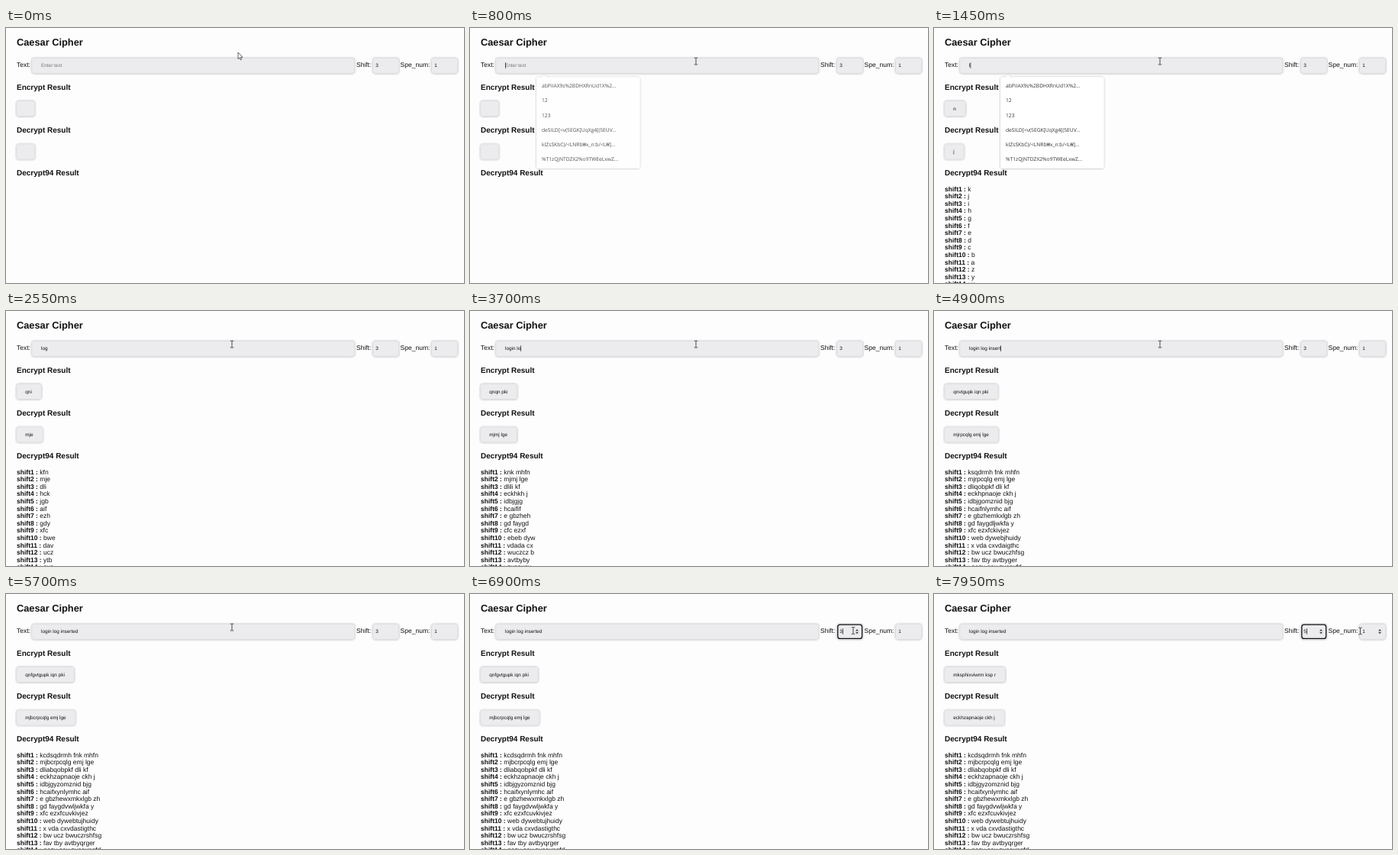
Animation, 600 px wide and 334 px high, one loop 8 s. Source, as an HTML page:

```html
<!DOCTYPE html>
<html lang="en">
<head>
<meta charset="utf-8">
<title>Caesar Cipher</title>
<style>
  html, body { margin: 0; width: 100%; height: 100%; overflow: hidden; background: #fdfdfe; }
  svg { display: block; width: 600px; height: 334px; }
  text { font-family: "Liberation Sans", Arial, sans-serif; fill: #111; text-rendering: geometricPrecision; }
  .title { font-size: 12.8px; font-weight: bold; }
  .heading { font-size: 10px; font-weight: bold; }
  .body { font-size: 8.53px; }
  .body tspan { font-weight: bold; }
  .small { font-size: 6.4px; }
  .hint { fill: #777; }
  .field { fill: #ecebed; stroke: #d6d5d8; stroke-width: .5; filter: url(#glow); }
  .menu { fill: #fff; filter: url(#glow); }
  .option { font: 6.7px "Open Sans", "Noto Sans", sans-serif; fill: #333; }
  .caret { fill: #111; }
  .ring { fill: none; stroke: #111; stroke-width: 1.3; }
</style>
</head>
<body>
<svg id="stage" viewBox="0 0 600 334">
  <defs>
    <filter id="glow" x="-20%" y="-20%" width="140%" height="140%">
      <feDropShadow dx="0" dy="0.2" stdDeviation="1" flood-color="#000" flood-opacity=".36"/>
    </filter>
  </defs>
</svg>
<script>
const LOOP = 8000, ROWS = 14, BLINK = 500;
const PHRASE = 'login log inserted';
const KEY_TIMES = [1400, 1750, 1950, 2600, 2750, 3150, 3500, 3650, 3800,
  3950, 4100, 4250, 4400, 4550, 4700, 4850, 5000, 5150];
const CLICK_TEXT = 700, MENU_END = 1490, CLICK_SHIFT = 6800, NEW_SHIFT = 7460;
const OPTIONS = ['abPiIAX9s%2BDHXRnUd1X%2...', '12', '123', 'deSILD[<v(5EGK[UqXg4[(5EUV...',
  'kIZsSKbC)/<LNRb₩x_n:b/<L₩]...', '%T1zQjNTDZX2%o9TWEeLxwZ...'];
// Pointer stops: time, x, y
const PATH = [[0, 304, 32], [100, 304, 32], [550, 296, 43.5], [5850, 296, 43.5],
  [6650, 502, 48], [7150, 502, 48], [7620, 558.5, 48.5], [8000, 558.5, 48.5]];

const stage = document.getElementById('stage');
const pen = document.createElement('canvas').getContext('2d');
pen.font = '6.4px "Liberation Sans", Arial, sans-serif';
const widthOf = s => pen.measureText(s).width;

function add(tag, attrs, parent = stage) {
  const node = document.createElementNS('http://www.w3.org/2000/svg', tag);
  for (const key in attrs) node.setAttribute(key, attrs[key]);
  return parent.appendChild(node);
}
function label(x, y, cls, content = '', parent = stage) {
  const node = add('text', { x, y, class: cls }, parent);
  node.textContent = content;
  return node;
}
const field = (x, y, width) => add('rect', { x, y, width, height: 20, rx: 3, class: 'field' });
const show = (node, on) => node.setAttribute('visibility', on ? 'visible' : 'hidden');
const move = (node, x, y) => node.setAttribute('transform', `translate(${x} ${y})`);
function write(node, s) {
  if (node.textContent !== s) node.textContent = s;
}

label(14, 23, 'title', 'Caesar Cipher');
label(14, 51.3, 'body', 'Text:');
label(459, 51.3, 'body', 'Shift:');
label(516.6, 51.3, 'body', 'Spe_num:');
field(33.8, 39.3, 423);
field(480.7, 39.3, 34);
field(557.5, 39.3, 34);
label(14, 80.7, 'heading', 'Encrypt Result');
label(14, 136.9, 'heading', 'Decrypt Result');
label(14, 193, 'heading', 'Decrypt94 Result');

const hint = label(46, 51.2, 'small hint', 'Enter text');
const input = label(46, 51.2, 'small');
const shiftValue = label(484.3, 51.2, 'small');
label(561.2, 51.2, 'small', '1');

const results = [95.5, 152].map(y => ({
  box: field(13.8, y, 24),
  text: label(25.3, y + 12, 'small')
}));

const rows = Array.from({ length: ROWS }, (_, i) => {
  const row = label(14, 213.6 + 9.6 * i, 'body');
  const name = add('tspan', {}, row);
  name.textContent = `shift${i + 1} :`;
  return { row, value: row.appendChild(document.createTextNode('')) };
});

const ring = add('rect', { x: 481.8, y: 40.2, width: 31.8, height: 18.2, rx: 3, class: 'ring' });
const spinner = x => add('path', { d: `M${x - 2} 48.4l2-2.4 2 2.4zM${x - 2} 49.9l2 2.4 2-2.4z`, fill: '#444' });
const shiftSpin = spinner(507), numSpin = spinner(584);
const caret = add('rect', { y: 45.2, width: .7, height: 7.6, class: 'caret' });

const menu = add('g', {});
add('path', { d: 'M90 64.3H94L97 61.6 100 64.3H219.5a3 3 0 0 1 3 3V181a3 3 0 0 1-3 3H90a3 3 0 0 1-3-3V67.3a3 3 0 0 1 3-3z', class: 'menu' }, menu);
OPTIONS.forEach((s, i) => label(94, 78 + 19.25 * i, 'option', s, menu));

const arrow = add('path', {
  d: 'M0 0V8.6L2 6.8 3.3 9.8 4.6 9.2 3.3 6.3H6z',
  fill: '#fff', stroke: '#222', 'stroke-width': .7, 'stroke-linejoin': 'round'
});
const beam = add('path', {
  d: 'M-2.2-4.4H-.6L0-4 .6-4.4H2.2M0-4V4M-2.2 4.4H-.6L0 4 .6 4.4H2.2',
  fill: 'none', stroke: '#222', 'stroke-width': .8
});

// Reverse, rotate right by |k|, then move each letter by k.
function cipher(text, k) {
  const n = text.length, turn = Math.abs(k) % n;
  const reversed = [...text].reverse().join('');
  const turned = reversed.slice(n - turn) + reversed.slice(0, n - turn);
  return turned.replace(/[a-z]/g, c =>
    String.fromCharCode((c.charCodeAt(0) - 97 + k + 26) % 26 + 97)).trim();
}

function pointerAt(t) {
  let i = 1;
  while (PATH[i][0] < t) i++;
  const [t0, x0, y0] = PATH[i - 1], [t1, x1, y1] = PATH[i];
  const p = (t - t0) / (t1 - t0), e = p * p * (3 - 2 * p);
  return [x0 + (x1 - x0) * e, y0 + (y1 - y0) * e];
}

function render(t) {
  const typed = KEY_TIMES.filter(k => k <= t);
  const text = PHRASE.slice(0, typed.length);
  const shift = t < NEW_SHIFT ? 3 : 5;
  write(input, text);
  write(shiftValue, String(shift));
  show(hint, !text);

  results.forEach(({ box, text: node }, i) => {
    const out = text && cipher(text, (shift - 1) * (i ? -1 : 1));
    write(node, out);
    box.setAttribute('width', 24 + widthOf(out));
  });
  rows.forEach(({ row, value }, i) => {
    show(row, text);
    value.data = text ? ' ' + cipher(text, -i - 1) : '';
  });

  const inShift = t >= CLICK_SHIFT;
  const lastAction = Math.max(...[CLICK_TEXT, ...typed, CLICK_SHIFT, NEW_SHIFT].filter(k => k <= t));
  show(caret, t >= CLICK_TEXT && (t - lastAction) % (2 * BLINK) < BLINK);
  caret.setAttribute('x', inShift ? 488.1 : 46.1 + widthOf(text));
  show(ring, inShift);

  show(menu, t >= CLICK_TEXT && t < MENU_END);
  menu.setAttribute('opacity', Math.min(1, Math.max(0, (t - CLICK_TEXT) / 120)));

  const [x, y] = pointerAt(t);
  const over = (a, b) => y > 39 && x > a && x < b;
  const overShift = over(480.5, 515), overNum = over(557, 592);
  const onField = over(33, 457) || overShift || overNum;
  show(shiftSpin, overShift || inShift);
  show(numSpin, overNum);
  show(beam, onField);
  show(arrow, !onField);
  move(beam, x, y);
  move(arrow, x, y);
}

const start = performance.now();
function tick() {
  render((performance.now() - start) % LOOP);
  requestAnimationFrame(tick);
}
tick();
</script>
</body>
</html>
```
